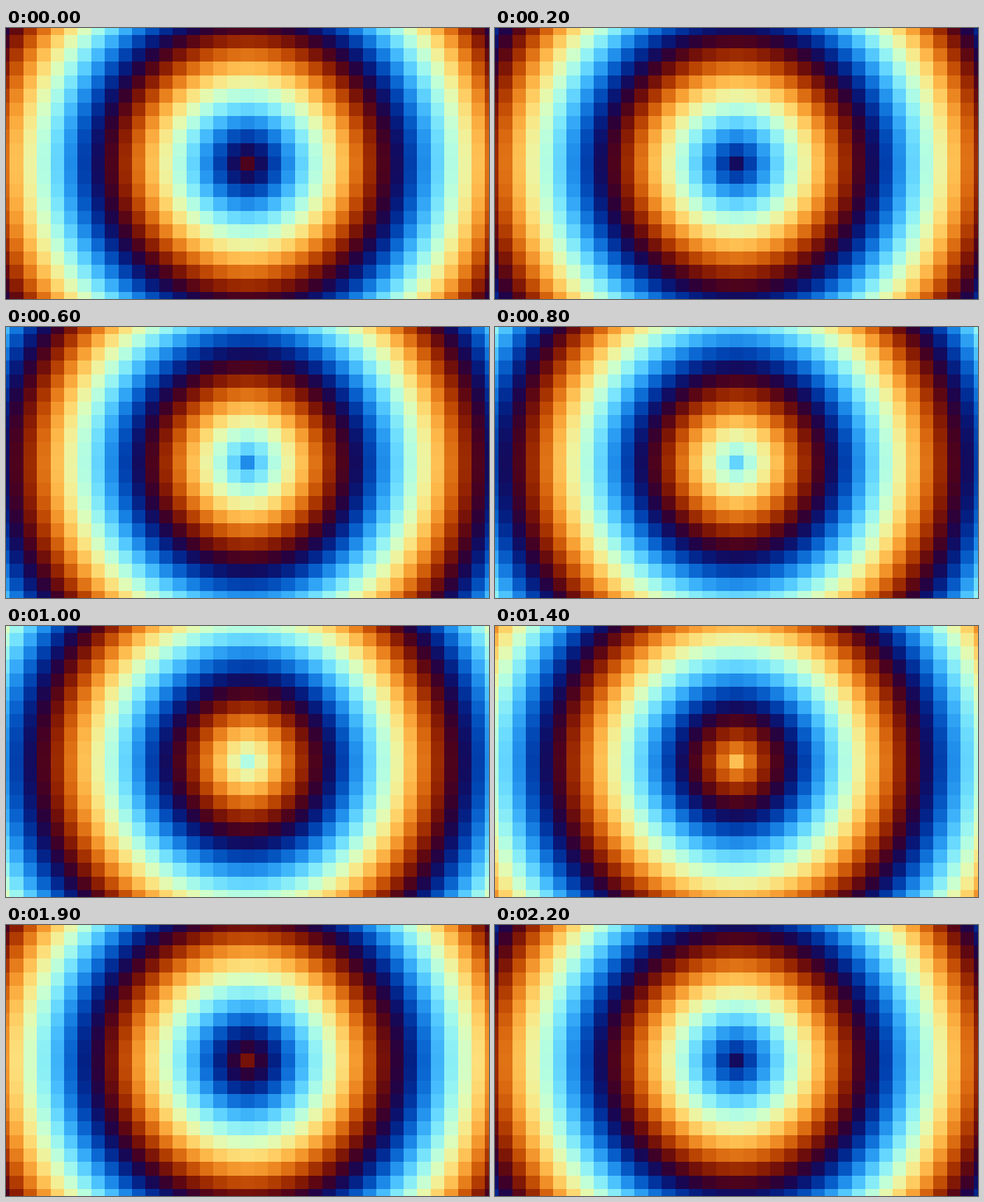
An HTML page with a canvas for the animation above (2300 ms loop, 690 by 388 pixels).

```html
<!DOCTYPE html>
<html lang="en">
<head>
<meta charset="utf-8">
<title>Pixel rings</title>
<style>
  html, body { margin: 0; width: 100%; height: 100%; overflow: hidden; background: #000; }
  canvas { display: block; }
</style>
</head>
<body>
<canvas id="stage" width="690" height="388"></canvas>
<script>
const W = 690, H = 388;
const CELL = H / 20;
const COLS = 18, ROWS = 10;
const STEP_MS = 100, STEPS = 23;
const START = 0.05, SHIFT = 0.05;   // colour phase, and its change per step
const OFFSETS = [0.263, 0.416, 0.557];

const ctx = document.getElementById('stage').getContext('2d');

// Cosine palette with period 1
function palette(t) {
  const rgb = OFFSETS.map(d => Math.round(127.5 + 127.5 * Math.cos(2 * Math.PI * (t + d))));
  return `rgb(${rgb})`;
}

// Whole-pixel edge of a cell, counted from the centre of the stage
const edge = (size, i) => Math.ceil(size / 2 + (i - 0.5) * CELL - 0.501);

function draw(step) {
  const phase = START + step * SHIFT;
  for (let row = -ROWS; row <= ROWS; row++) {
    const y = edge(H, row), h = edge(H, row + 1) - y;
    for (let col = -COLS; col <= COLS; col++) {
      const x = edge(W, col), w = edge(W, col + 1) - x;
      ctx.fillStyle = palette(Math.hypot(col, row) / 10 + phase);
      ctx.fillRect(x, y, w, h);
    }
  }
}

let shown = -1;
function tick() {
  const step = Math.floor(performance.now() / STEP_MS) % STEPS;
  if (step !== shown) draw(shown = step);
  requestAnimationFrame(tick);
}
tick();
</script>
</body>
</html>
```
